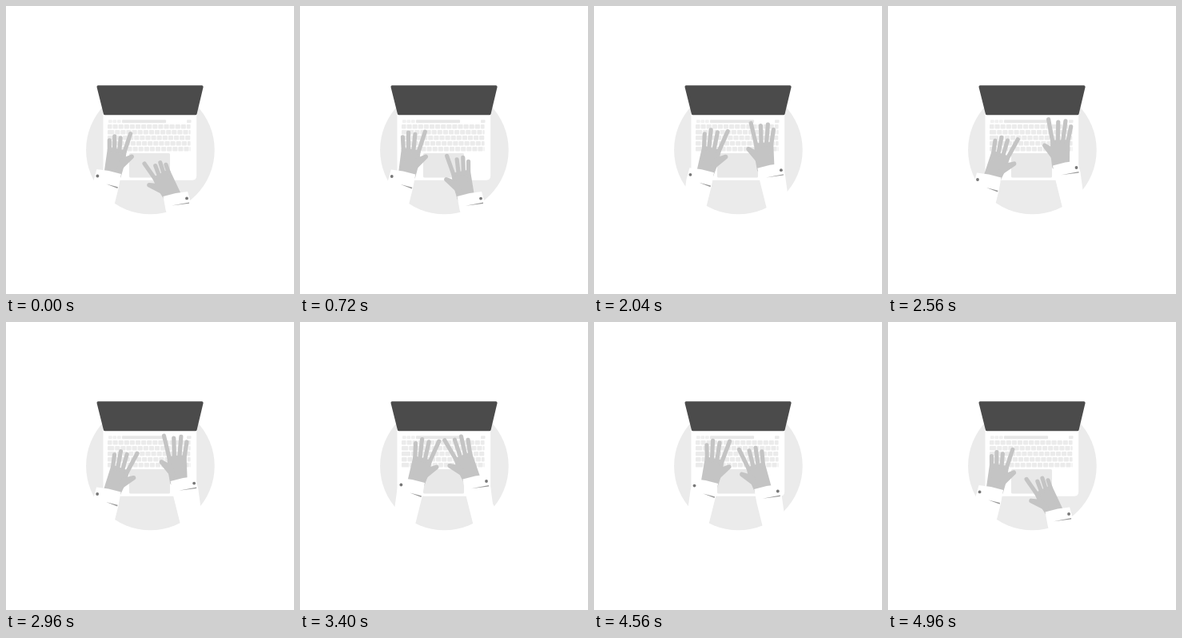
Recreate the animation shown at these times as an HTML page with a canvas. Size 360x360 px, loop 5 s.

```html
<!DOCTYPE html>
<html lang="en">
<head>
<meta charset="utf-8">
<title>Typing hands</title>
<style>
html, body { margin: 0; width: 100%; height: 100%; overflow: hidden; background: #fff; }
canvas { display: block; }
</style>
</head>
<body>
<canvas id="stage" width="360" height="360"></canvas>
<script>
const ctx = document.getElementById('stage').getContext('2d');
const LOOP = 5000;
const SKIN = '#c4c4c4', KEY = '#ebebeb', SCREEN = '#4b4b4b';

// Each hand rests at [cuff x, cuff y, tilt in degrees, finger reach]
const poses = [
  { from: 0, to: 0, left: [114.4, 212.5, 10, 0.85], right: [226, 240.4, -27, 0.8] },
  { from: 720, to: 820, left: [114.8, 213, 9, 0.95], right: [226, 240.6, -11, 0.88] },
  { from: 1200, to: 1550, left: [130.5, 203.5, 8, 1.04], right: [232, 209, -8, 0.97] },
  { from: 2480, to: 2820, left: [112, 217, 20, 0.93], right: [235.5, 202, -1, 1.02] },
  { from: 3400, to: 3400, left: [126.4, 203.5, 15, 1], right: [233, 199, -21, 1] },
  { from: 4040, to: 4350, left: [129.2, 202, 12, 1.02], right: [231, 202, -14, 1] }
];
poses.push({ ...poses[0], from: LOOP });

// Left-hand shapes; the right hand mirrors them
const fingertips = [[-13, -44], [-6.5, -51], [2.5, -50], [14.5, -54]];
const thumbTip = [20, -22];
const wristOffset = [19.3, -6];
const sleeve = [[-1, -8.5], [14, -6.5], [29.5, -2.5], [26.5, 14], [17.5, 50],
  [8, 90], [-40, 90], [-8, 28], [-5, 6]];
const slits = {
  left: [[11, 10], [25.5, 13.7], [25, 15.4]],
  right: [[19, 9.2], [-3, 5], [-3, 6.4]]
};

function fillPath(points, color) {
  ctx.beginPath();
  points.forEach(p => ctx.lineTo(...p));
  ctx.closePath();
  ctx.fillStyle = color;
  ctx.fill();
}

function box(x, y, w, h, r, color) {
  ctx.beginPath();
  ctx.roundRect(x, y, w, h, r);
  ctx.fillStyle = color;
  ctx.fill();
}

function disc(x, y, r, color) {
  ctx.beginPath();
  ctx.arc(x, y, r, 0, Math.PI * 2);
  ctx.fillStyle = color;
  ctx.fill();
}

function softPath(points, color, width) {
  fillPath(points, color);
  ctx.strokeStyle = color;
  ctx.lineWidth = width;
  ctx.stroke();
}

function drawKeyboard() {
  const start = 127, end = 231.5, pitch = 7.1;
  for (let x = 128; x < 144; x += 5.5) box(x, 142.3, 4.7, 4, 1, '#f0f0f0');
  box(145, 142.3, 55, 4, 1, '#e7e7e7');
  box(226, 142.3, 5.5, 4, 1, KEY);
  for (let row = 0; row < 5; row++) {
    let x = start, next = start + 6.5 + row * 2.7 % pitch;
    while (x < end - 2) {
      box(x, 148.1 + row * 7, Math.min(next, end) - x - 0.9, 5.5, 1, KEY);
      x = next;
      next += pitch;
    }
  }
}

function drawLaptop() {
  box(121.5, 130, 116.7, 87.8, 5, '#fff');
  drawKeyboard();
  box(154, 184, 51, 30.5, 1.5, '#e8e8e8');
  softPath([[115.3, 101], [244.8, 101], [236.8, 134.5], [123.7, 134.5]], SCREEN, 3.6);
}

function drawHand(side, [x, y, tilt, reach]) {
  const mirror = side === 'left' ? 1 : -1;
  const angle = mirror * tilt * Math.PI / 180;

  ctx.save();
  ctx.translate(x, y);
  ctx.scale(mirror, 1);

  ctx.save();
  ctx.translate(...wristOffset);
  ctx.rotate(angle);
  const knuckles = fingertips.map((_, i) => [i * 6.3 - 9, -26]);
  softPath([[-8, 5], ...knuckles, [10.5, -14], [8.5, 5]], SKIN, 5.2);
  fingertips.forEach(([tx, ty], i) => {
    const stretch = i === 3 ? (1 + reach) / 2 : reach;
    softPath([knuckles[i], [tx * stretch, ty * stretch]], SKIN, 5.2);
  });
  softPath([[7, -4], [9, -15], thumbTip], SKIN, 5.6);
  ctx.restore();

  fillPath(sleeve, '#fff');
  fillPath(slits[side], '#9a9a9a');
  disc(0, 0, 1.9, '#777');
  ctx.restore();
}

function poseAt(side, time) {
  const next = poses.findIndex(pose => pose.from > time);
  const a = poses[next - 1], b = poses[next];
  const u = Math.max(0, (time - a.to) / (b.from - a.to));
  const ease = u * u * (3 - 2 * u);
  return a[side].map((v, i) => v + (b[side][i] - v) * ease);
}

function frame() {
  const time = performance.now() % LOOP;
  ctx.lineCap = ctx.lineJoin = 'round';
  ctx.clearRect(0, 0, 360, 360);
  disc(180.4, 180, 80.3, '#ebebeb');
  drawLaptop();
  for (const side of ['left', 'right']) drawHand(side, poseAt(side, time));
  requestAnimationFrame(frame);
}
frame();
</script>
</body>
</html>
```
